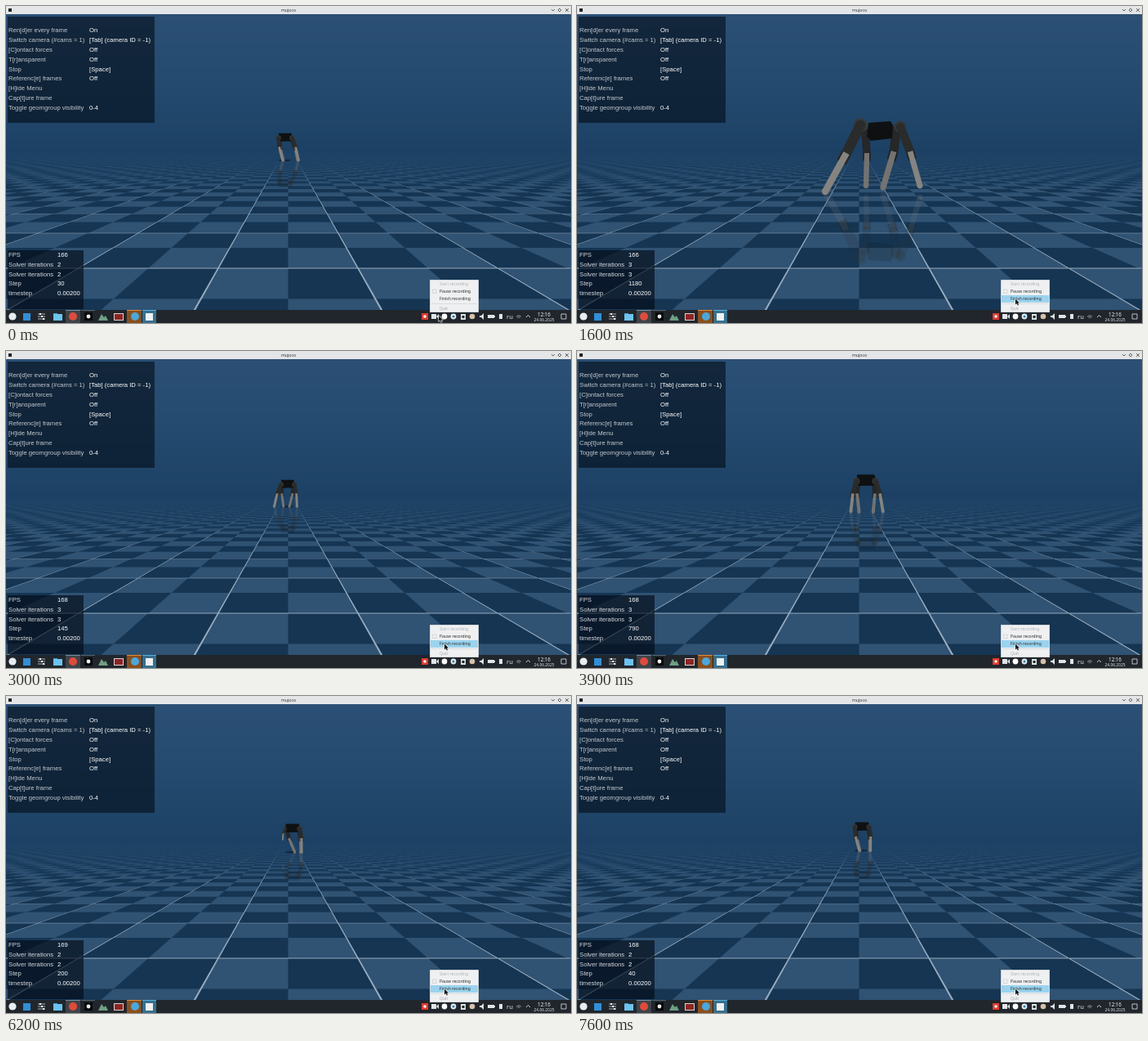
Animation, 692 px wide and 388 px high, one loop 7700 ms. Source, as an HTML page with a canvas:

```html
<!DOCTYPE html>
<html>
<head>
<meta charset="utf-8">
<style>
html, body { margin: 0; width: 692px; height: 388px; overflow: hidden; background: #23282d; }
canvas { display: block; }
</style>
</head>
<body>
<canvas id="stage" width="692" height="388"></canvas>
<script>
const W = 692, H = 388, TOP = 10, BOTTOM = 372, HORIZON = 170;
const LOOP = 7700, TICK = 100;
const ARIAL = '"Liberation Sans", Arial, sans-serif';
const NOTO = '"Noto Sans", "Open Sans", sans-serif';
const ctx = document.getElementById('stage').getContext('2d');

const lerp = (a, b, p) => a + (b - a) * p;
const clamp = v => Math.max(0, Math.min(1, v));
const mix = (a, b, p) => a.map((v, i) => lerp(v, b[i], p));

function layer(paint) {
  const c = document.createElement('canvas');
  c.width = W;
  c.height = H;
  paint(c.getContext('2d'));
  return c;
}

function rect(g, x, y, w, h, color) {
  g.fillStyle = color;
  g.fillRect(x, y, w, h);
}

function disc(g, x, y, r, color) {
  g.fillStyle = color;
  g.beginPath();
  g.arc(x, y, r, 0, 7);
  g.fill();
}

function poly(g, pts, color) {
  g.fillStyle = color;
  g.beginPath();
  for (let i = 0; i < pts.length; i += 2) g.lineTo(pts[i], pts[i + 1]);
  g.closePath();
  g.fill();
}

function line(g, pts, width, color, cap = 'butt') {
  g.strokeStyle = color;
  g.lineWidth = width;
  g.lineCap = cap;
  g.lineJoin = 'round';
  g.beginPath();
  for (let i = 0; i < pts.length; i += 2) g.lineTo(pts[i], pts[i + 1]);
  g.stroke();
}

function text(g, str, x, y, size, color, font = NOTO, align = 'left') {
  g.font = size + 'px ' + font;
  g.textAlign = align;
  g.textBaseline = 'alphabetic';
  g.fillStyle = color;
  g.fillText(str, x, y);
}

// ---- scene: sky and checkered floor ----

const HAZE = [29, 66, 101], LIGHT = [48, 82, 115], DARK = [21, 53, 83], EDGE = [150, 171, 190];

function floorColor(x, y) {
  const dy = y - HORIZON;
  const u = (x - 345.5) / (0.567 * dy);
  const v = (1 / dy - 1 / 151) / 0.00132;
  const col = Math.floor(u), row = Math.floor(v);
  const edgeU = Math.abs((u + 1) / 2 - Math.round((u + 1) / 2)) * 2;
  const edgeV = Math.abs(v / 2 - Math.round(v / 2)) * 2;
  if (edgeU < 0.011 || edgeV < 0.013) return EDGE;
  return (col + row) & 1 ? DARK : LIGHT;
}

function skyColor(y) {
  const p = (y - TOP) / 175;
  return p < 0.5 ? mix([44, 80, 117], [36, 74, 111], p * 2) : mix([36, 74, 111], [27, 64, 99], p * 2 - 1);
}

const scene = layer(g => {
  const img = g.createImageData(W, H), n = 4;
  for (let y = TOP; y < BOTTOM; y++) {
    const fade = clamp((y - 180) / 45);
    for (let x = 0; x < W; x++) {
      let c = skyColor(Math.min(y, 185));
      if (fade > 0) {
        const sum = [0, 0, 0];
        for (let k = 0; k < n * n; k++) {
          const s = floorColor(x + (k % n + 0.5) / n, y + (Math.floor(k / n) + 0.5) / n);
          for (let i = 0; i < 3; i++) sum[i] += s[i] / (n * n);
        }
        c = mix(HAZE, sum, fade);
      }
      img.data.set([...c, 255], (y * W + x) * 4);
    }
  }
  g.putImageData(img, 0, 0);
});

// ---- desktop: title bar, panels, task bar, menu ----

const panelRow = (base, i) => base + i * 11.85;

const desktop = layer(g => {
  rect(g, 0, 0, W, TOP, '#e3e5e7');
  rect(g, 3, 3, 4, 4, '#222');
  text(g, 'mujoco', 346, 7, 5.2, '#30343a', NOTO, 'center');
  line(g, [668, 4, 670, 6, 672, 4], 0.8, '#444');
  line(g, [678, 3, 680, 5, 678, 7, 676, 5, 678, 3], 0.8, '#444');
  line(g, [685, 3, 689, 7], 0.8, '#444');
  line(g, [689, 3, 685, 7], 0.8, '#444');

  rect(g, 2, 13, 180, 130, 'rgba(4,12,22,.6)');
  rect(g, 2, 299, 93, 72, 'rgba(4,12,22,.65)');
  [['Ren[d]er every frame', 'On'], ['Switch camera (#cams = 1)', '[Tab] (camera ID = -1)'],
    ['[C]ontact forces', 'Off'], ['T[r]ansparent', 'Off'], ['Stop', '[Space]'],
    ['Referenc[e] frames', 'Off'], ['[H]ide Menu', ''], ['Cap[t]ure frame', ''],
    ['Toggle geomgroup visibility', '0-4']].forEach(([label, value], i) => {
    text(g, label, 3, panelRow(32.2, i), 7.7, '#c3c9cf', ARIAL);
    text(g, value, 102, panelRow(32.2, i), 7.7, '#fff', ARIAL);
  });
  ['FPS', 'Solver iterations', 'Solver iterations', 'Step', 'timestep'].forEach((label, i) =>
    text(g, label, 3, panelRow(306.8, i), 7.7, '#d5d9dd', ARIAL));

  rect(g, 0, BOTTOM, W, H - BOTTOM, '#20262c');
  rect(g, 73, 373, 18, 15, '#3d4449');
  rect(g, 148, 373, 18, 15, '#8a4f1c');
  rect(g, 167, 373, 17, 15, '#366f8d');
  rect(g, 73, 372, 18, 1, '#7d8a92');
  rect(g, 92, 372, 17, 1, '#59656d');
  rect(g, 148, 372, 18, 1, '#e08a35');
  rect(g, 167, 372, 17, 1, '#4fb3e0');
  disc(g, 8, 380, 4.6, '#e8edf0');
  rect(g, 21, 376, 9, 9, '#2f8fd8');
  [377, 380, 383].forEach((y, i) => {
    line(g, [39, y, 48, y], 0.8, '#cfd5d9');
    rect(g, 41 + i * 2, y - 1, 2, 2, '#fff');
  });
  rect(g, 58, 376, 5, 2, '#3a9bd5');
  rect(g, 58, 377, 11, 8, '#6cc3ee');
  disc(g, 82, 380, 5, '#e24a3b');
  rect(g, 96, 375, 10, 10, '#07090a');
  disc(g, 101, 380, 2.4, '#f1f1f1');
  poly(g, [113, 385, 117, 377, 120, 381, 122, 379, 125, 385], '#6f9f83');
  rect(g, 132, 376, 12, 9, '#d9d4d2');
  rect(g, 133, 377, 10, 7, '#8e2523');
  disc(g, 158, 380, 5, '#48a9df');
  rect(g, 171, 376, 9, 9, '#edf1f3');

  const pale = '#dfe4e7';
  rect(g, 509, 376, 8, 8, '#e5392f');
  disc(g, 513, 380, 1.8, '#fff');
  rect(g, 521, 377, 6, 6, pale);
  poly(g, [527, 380, 530, 377, 530, 383], pale);
  disc(g, 537, 380, 3.4, '#fff');
  disc(g, 548, 380, 3.4, '#e4ecf0');
  disc(g, 548, 380, 1.5, '#2e7fa8');
  rect(g, 557, 377, 6, 7, pale);
  rect(g, 558.5, 379, 3, 3, '#20262c');
  disc(g, 571, 380, 3.3, '#d8c0aa');
  poly(g, [580, 379, 582, 379, 585, 376, 585, 384, 582, 381, 580, 381], pale);
  rect(g, 590, 378, 8, 4, pale);
  rect(g, 598, 379, 1, 2, pale);
  rect(g, 604, 377, 4, 6, pale);
  text(g, 'ru', 613, 383, 7.6, pale);
  g.strokeStyle = '#98a0a6';
  g.lineWidth = 1;
  [2, 4].forEach(r => {
    g.beginPath();
    g.arc(628, 383, r, -2.4, -0.75);
    g.stroke();
  });
  line(g, [637, 381, 639.5, 378.5, 642, 381], 0.9, pale);
  text(g, '12:16', 659, 380, 6.2, '#f2f4f5', NOTO, 'center');
  text(g, '24.06.2025', 659, 386, 4.9, '#dfe4e7', NOTO, 'center');
  g.strokeStyle = pale;
  g.lineWidth = 0.8;
  g.strokeRect(680, 377, 6, 6);
});

function drawMenu(hover) {
  rect(ctx, 519, 335, 60, 40, '#b5babd');
  rect(ctx, 519.5, 335.5, 59, 39, '#eff0f1');
  if (hover) rect(ctx, 520, 354, 58, 9, '#9bd3ee');
  line(ctx, [521, 364.5, 577, 364.5], 0.6, '#cdd0d2');
  ctx.strokeStyle = '#c3c6c8';
  ctx.lineWidth = 0.6;
  ctx.strokeRect(522.5, 347, 4.5, 4.5);
  text(ctx, 'Start recording', 531, 342, 5, '#aeb1b3');
  text(ctx, 'Pause recording', 531, 351, 5, '#26292c');
  text(ctx, 'Finish recording', 531, 360.2, 5, '#26292c');
  text(ctx, 'Quit', 531, 372, 5, '#a4a7a9');
}

function drawCursor(x, y) {
  const shape = [0, 0, 0, 7, 1.7, 5.5, 2.8, 8, 4, 7.4, 2.9, 5, 5, 5];
  const pts = shape.map((v, i) => v + (i % 2 ? y : x));
  line(ctx, [...pts, x, y], 1.2, '#f4f4f4');
  poly(ctx, pts, '#111');
}

// ---- robot: a pose is a body outline (6 points) and four legs (hip, knee, foot) ----

const OUTLINE = [-0.75, -0.5, 0.7, -0.5, 0.78, -0.3, 0.7, 0.42, -0.65, 0.45, -0.78, 0.2];

function rig(x, y, size, feet, lift = 0) {
  const legs = feet.map((f, i) => {
    const side = i < 2 ? -1 : 1;
    const hx = side * (i % 3 ? 0.66 : 0.8), hy = 0.05;
    const fy = i ? 2.65 : 2.65 - lift;
    return [hx, hy, lerp(hx, f, 0.4) + side * 0.12, lerp(hy, fy, 0.4), f, fy];
  });
  const place = pts => pts.map((v, i) => (i % 2 ? y : x) + v * size);
  return { size, body: place(OUTLINE), legs: legs.map(place) };
}

function zoom(pose, k) {
  const scale = pts => pts.map((v, i) => lerp(i % 2 ? HORIZON : 400, v, k));
  return { size: pose.size * k, body: scale(pose.body), legs: pose.legs.map(scale) };
}

const near = {
  size: 28,
  body: [357, 143, 384, 141, 387, 146, 386, 162, 360, 165, 355, 160],
  legs: [[347, 146, 330, 180, 304, 227], [353, 155, 355, 180, 354, 220],
    [391, 152, 388, 178, 375, 222], [396, 148, 408, 178, 420, 220]]
};
const close = {
  size: 110,
  body: [390, -10, 900, -60, 900, 60, 620, 106, 412, 133, 382, 40],
  legs: [[345, -30, 236, 238, 117, 570], [372, 75, 326, 187, 306, 350],
    [535, 105, 511, 190, 508, 350], [722, 130, 676, 203, 650, 520]]
};
const START = [-0.3, -0.2, 0.85, 0.95], STRIDE = [-1.3, -0.5, 0.8, 1.4];
const first = () => rig(349, 160, 11, START);

const keys = [
  [0, rig(342, 161, 10.5, [-0.3, -0.2, 1.45, 1.55])],
  [1600, near], [2100, close], [2400, zoom(close, 2.6)], [2700, zoom(close, 9)],
  [2800, first()], [3000, rig(345, 163, 10.3, [-1.6, -0.5, 0.2, 1.1])], [4100, rig(357, 157, 16, STRIDE)],
  [4200, first()], [4900, rig(351, 163, 12, [-1.35, -1.2, 0.75, 1.7])], [5900, rig(373, 161, 16, STRIDE)],
  [6000, first()], [6200, rig(351, 162, 11, [-1.1, 0.25, 0.9, 1], 1.4)],
  [7200, rig(372, 157, 16, STRIDE)], [7500, rig(396, 148, 24, STRIDE)],
  [7600, first()]
];

// Sizes grow like 1 / distance; feet swing between keys and land on them.
function poseAt(t) {
  const i = keys.findLastIndex(k => k[0] <= t);
  const [ta, a] = keys[i], [tb, b] = keys[i + 1] || [LOOP, a];
  const p = (t - ta) / (tb - ta);
  const size = 1 / lerp(1 / a.size, 1 / b.size, p);
  const gap = b.size - a.size;
  const w = Math.abs(gap) < 0.5 ? p : (size - a.size) / gap;
  const swing = Math.sin(2 * Math.PI * p * Math.round((tb - ta) / 400)) * Math.min(size, 30);
  const legs = a.legs.map((leg, n) => {
    const pts = mix(leg, b.legs[n], w), dir = n % 3 ? -1 : 1;
    pts[2] += swing * 0.12 * dir;
    pts[4] += swing * 0.3 * dir;
    pts[5] -= Math.max(0, swing * dir) * 0.2;
    return pts;
  });
  return { size, body: mix(a.body, b.body, w), legs };
}

function drawLeg([hx, hy, kx, ky, fx, fy], front) {
  const w = Math.hypot(fx - kx, fy - ky) * 0.145 + 0.6;
  const along = q => [lerp(kx, fx, q), lerp(ky, fy, q)];
  disc(ctx, hx, hy, w * 1.05, '#37393a');
  line(ctx, [hx, hy, kx, ky], w * 1.5, front ? '#2a2b2b' : '#252728', 'round');
  line(ctx, [kx, ky, ...along(0.24)], w * 1.55, front ? '#2a2b2b' : '#252728');
  line(ctx, [kx, ky, ...along(0.24)], w * 1.15, '#121313');
  line(ctx, [kx, ky, fx, fy], w, front ? '#858480' : '#74736f');
  disc(ctx, fx, fy, w * 0.5, front ? '#858480' : '#74736f');
}

function drawRobot({ body, legs }) {
  drawLeg(legs[1]);
  drawLeg(legs[2]);
  poly(ctx, body, '#0f1011');
  drawLeg(legs[3], true);
  drawLeg(legs[0], true);
}

function drawScene(t) {
  const pose = poseAt(t);
  const ground = Math.max(...pose.legs.map(l => l[5]));
  ctx.save();
  ctx.beginPath();
  ctx.rect(0, TOP, W, BOTTOM - TOP);
  ctx.clip();
  ctx.drawImage(scene, 0, 0);
  if (pose.size < 60) {
    ctx.save();
    ctx.globalAlpha = 0.17;
    ctx.translate(0, ground * 2);
    ctx.scale(1, -1);
    drawRobot(pose);
    ctx.restore();
  }
  if (pose.size < 13) {
    ctx.fillStyle = 'rgba(6,16,28,.6)';
    ctx.beginPath();
    ctx.ellipse(pose.body[0] + 7, ground, 8, 1.2, 0, 0, 7);
    ctx.fill();
  }
  drawRobot(pose);
  ctx.restore();
}

// ---- counters and main loop ----

const RESETS = [-42, 2800, 4191, 5922, 7544];
const RATES = [[0, 166], [1900, 168], [4000, 170], [5900, 169], [7300, 168]];

function draw(t) {
  drawScene(t);
  ctx.drawImage(desktop, 0, 0);
  const began = RESETS.findLast(r => r <= t);
  const iterations = t >= 400 && t < 5900 ? 3 : 2;
  const step = Math.round((t - began) * 0.72 / 5) * 5;
  const fps = RATES.findLast(r => r[0] <= t)[1];
  [fps, iterations, iterations, step, '0.00200'].forEach((v, i) =>
    text(ctx, String(v), 63, panelRow(306.8, i), 7.7, '#fff', ARIAL));
  const p = clamp((t - 900) / 400);
  const x = lerp(530, 537, p), y = lerp(379, 358.5, p);
  drawMenu(y < 364);
  drawCursor(x, y);
}

const begin = performance.now();
function loop() {
  const t = (performance.now() - begin) % LOOP;
  draw(Math.floor(t / TICK) * TICK);
  requestAnimationFrame(loop);
}
loop();
</script>
</body>
</html>
```
